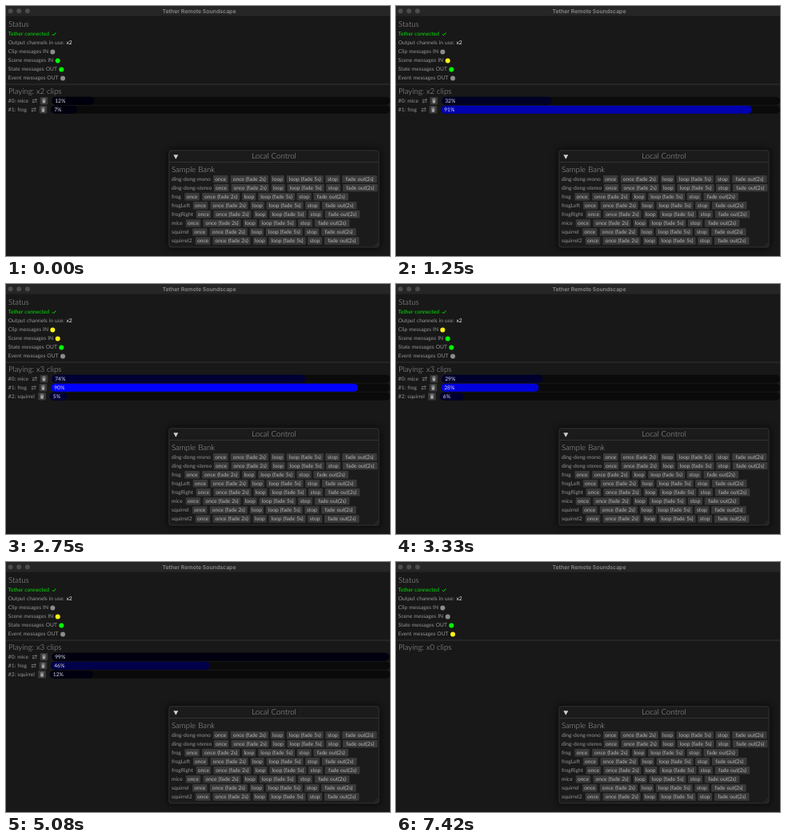
Animation, 480 px wide and 313 px high, one loop 7510 ms. Source, as an HTML page:

```html
<!DOCTYPE html>
<html lang="en">
<head>
<meta charset="utf-8">
<title>Tether Remote Soundscape</title>
<style>
  html, body { margin: 0; width: 100%; height: 100%; overflow: hidden; background: #181818; }
  svg { display: block; width: 480px; height: 313px; text-rendering: geometricPrecision; }
  text { font: 400 6.65px Lato, "Open Sans", sans-serif; fill: #969696; word-spacing: .4px; white-space: pre; }
  .head { font-size: 9.7px; font-weight: 300; fill: #a8a8a8; }
  .title { font: 600 6.9px Inter, sans-serif; fill: #8a8a8a; word-spacing: 0; }
  .strong { fill: #f4f4f4; }
  .on { fill: #00e800; }
  .btn { fill: #3a3a3a; }
  .cap { fill: #b8b8b8; }
  .pct { fill: #dcdeee; }
  .line { stroke: #3a3a3a; stroke-width: .8; fill: none; }
  .icon { stroke: #a4a4a4; stroke-width: .6; fill: none; }
</style>
</head>
<body>
<svg id="stage" viewBox="0 0 480 313" xmlns="http://www.w3.org/2000/svg">
  <defs>
    <filter id="blur" x="-20%" y="-30%" width="140%" height="160%"><feGaussianBlur stdDeviation="4.5"/></filter>
  </defs>
</svg>
<script>
const LOOP = 7510, FPS = 12, LAST = 89;
const stage = document.getElementById('stage');

function add(tag, attrs, parent = stage) {
  const el = document.createElementNS('http://www.w3.org/2000/svg', tag);
  for (const name in attrs) el.setAttribute(name, attrs[name]);
  return parent.appendChild(el);
}
const rect = (x, y, width, height, rest, parent) => add('rect', { x, y, width, height, ...rest }, parent);
const circle = (cx, cy, r, fill) => add('circle', { cx, cy, r, fill });
const path = (d, rest, parent) => add('path', { d, ...rest }, parent);
// y is the middle of the capital letters
function text(str, x, y, cls = '', parent = stage, anchor = 'start') {
  const drop = cls === 'head' ? 3.4 : 2.35;
  const el = add('text', { x, y: y + drop, class: cls, 'text-anchor': anchor }, parent);
  el.textContent = str;
  return el;
}

// Title bar
rect(0, 0, 480, 12.5, { fill: '#262626' });
for (const x of [5.6, 16.2, 26.9]) circle(x, 6.2, 3, '#4c4c4c');
text('Tether Remote Soundscape', 241.5, 6.3, 'title', stage, 'middle');

// Status panel
text('Status', 3, 23, 'head');
text('Tether connected', 2.8, 35, 'on');
path('M57.8 35.2l1.6 1.6 3-3.4', { stroke: '#00e800', 'stroke-width': 1, fill: 'none' });
text('Output channels in use:', 2.8, 46);
text('x2', 75.5, 46, 'strong');

// Message times in seconds for each lamp
const lamps = [
  { label: 'Clip messages IN', x: 58.3, sent: [1.33] },
  { label: 'Scene messages IN', x: 64.7, sent: [-.12, 2.8] },
  { label: 'State messages OUT', x: 69.3, always: true },
  { label: 'Event messages OUT', x: 71, sent: [6] }
];
lamps.forEach((lamp, i) => {
  const y = 57 + i * 11;
  text(lamp.label, 2.8, y);
  lamp.dot = circle(lamp.x, y + .4, 3, '#8c8c8c');
});
path('M0 98H480', { class: 'line' });
const heading = text('', 3, 106.5, 'head');

// Playing clips: position is counted in whole loops
const KEYS = [0, 1.25, 2, 3.333, 4, 5.083, 6];
const END = 5.99;
const clips = [
  { name: 'mice', x: 57.2, start: -.12, loop: 35.8, level: 55, rise: 2,
    pos: [.125, 1.325, 2.045, 3.297, 3.957, 4.995, 5.875] },
  { name: 'frog', x: 56.2, start: -.12, loop: 34.6, level: 255, rise: 2,
    pos: [.077, .917, 1.413, 2.288, 2.745, 3.468, 4.08] },
  { name: 'squirrel', x: 54.8, start: 1.33, level: 55, rise: 0,
    pos: [-.039, .0015, .026, .0695, .0914, .1267, .157] }
];
clips.forEach((clip, i) => {
  const y = 118.6 + i * 11.05, g = clip.row = add('g', {});
  text(`#${i}: ${clip.name}`, 2.8, y, '', g);
  if (clip.loop) {
    const x = clip.loop;
    path(`M${x - 3} ${y - 1.2}h5.6m-1.4-1.4l1.5 1.4l-1.5 1.4M${x + 3} ${y + 1.5}h-5.6m1.4-1.4l-1.5 1.4l1.5 1.4`, { class: 'icon' }, g);
  }
  const b = clip.x - 9.8;
  rect(b - 4.8, y - 4.7, 9.6, 9.6, { rx: 1.2, class: 'btn' }, g);
  path(`M${b - 2.5} ${y - 2}h5M${b - .9} ${y - 2.8}h1.8`, { class: 'icon' }, g);
  path(`M${b - 2} ${y - 1.2}h4l-.4 4.2h-3.2z`, { fill: '#a4a4a4' }, g);
  clip.width = 480 - clip.x;
  rect(clip.x, y - 4.9, clip.width, 10, { rx: 5, fill: '#0a0a0a' }, g);
  clip.bar = rect(clip.x, y - 4.9, 10, 10, { rx: 5 }, g);
  clip.pct = text('', clip.x + 4, y, 'pct', g);
});

// Local control window
rect(202, 179, 266.2, 125, { rx: 5, fill: '#000', opacity: .6, filter: 'url(#blur)' });
rect(203.8, 180.8, 262.4, 121.2, { rx: 3, fill: '#1b1b1b', stroke: '#3a3a3a', 'stroke-width': .8 });
path('M204 195.5H466', { class: 'line' });
path('M209.3 186.3h6l-3 5.4z', { fill: '#d0d0d0' });
text('Local Control', 335, 188, 'head', stage, 'middle');
text('Sample Bank', 207, 205, 'head');
path('M460.5 300.8l4.5-4.5M463 300.8l2-2', { class: 'line' });

// Button offset and width inside a row
const buttons = [
  ['once', 0, 18.5], ['once (fade 2s)', 21.8, 47], ['loop', 72, 17],
  ['loop (fade 5s)', 91.8, 46], ['stop', 140.3, 18], ['fade out(2s)', 161.2, 43.5]
];
const samples = [
  ['ding-dong-mono', 259], ['ding-dong-stereo', 259.8], ['frog', 223.3], ['frogLeft', 233.8],
  ['frogRight', 237.6], ['mice', 224.7], ['squirrel', 233], ['squirrel2', 236.8]
];
samples.forEach(([name, left], i) => {
  const y = 216.6 + i * 11.05;
  text(name, 207, y);
  for (const [label, dx, w] of buttons) {
    rect(left + dx, y - 4.7, w, 9.4, { rx: 1.2, class: 'btn' });
    text(label, left + dx + w / 2, y, 'cap', stage, 'middle');
  }
});

const clamp = v => Math.max(0, Math.min(1, v));

function position(pos, t) {
  let i = 0;
  while (i < KEYS.length - 2 && t >= KEYS[i + 1]) i++;
  return pos[i] + (pos[i + 1] - pos[i]) * (t - KEYS[i]) / (KEYS[i + 1] - KEYS[i]);
}

function volume(clip, t) {
  const up = clip.rise ? clamp((t - clip.start) / clip.rise) : 1;
  return clip.level * up * clamp((6 - t) / 3.1);
}

function lampColor({ always, sent }, t) {
  if (always) return '#00f800';
  const age = t - Math.max(...sent.filter(s => s <= t), -99);
  return age < 1.08 ? '#00f800' : age < 3.2 ? '#fff21a' : '#8c8c8c';
}

function draw(ms) {
  const t = Math.min(LAST, Math.floor((ms + 5) * FPS / 1000)) / FPS;
  for (const lamp of lamps) lamp.dot.setAttribute('fill', lampColor(lamp, t));
  let count = 0;
  for (const clip of clips) {
    const live = t >= clip.start && t < END;
    clip.row.style.display = live ? '' : 'none';
    if (!live) continue;
    count++;
    const part = position(clip.pos, t) % 1;
    clip.bar.setAttribute('width', Math.max(10, part * clip.width));
    clip.bar.setAttribute('fill', `rgb(0,0,${Math.round(Math.max(12, volume(clip, t)))})`);
    clip.pct.textContent = Math.floor(part * 100) + '%';
  }
  heading.textContent = `Playing: x${count} clips`;
}

const began = performance.now();
function tick() {
  draw((performance.now() - began) % LOOP);
  requestAnimationFrame(tick);
}
tick();
</script>
</body>
</html>
```
